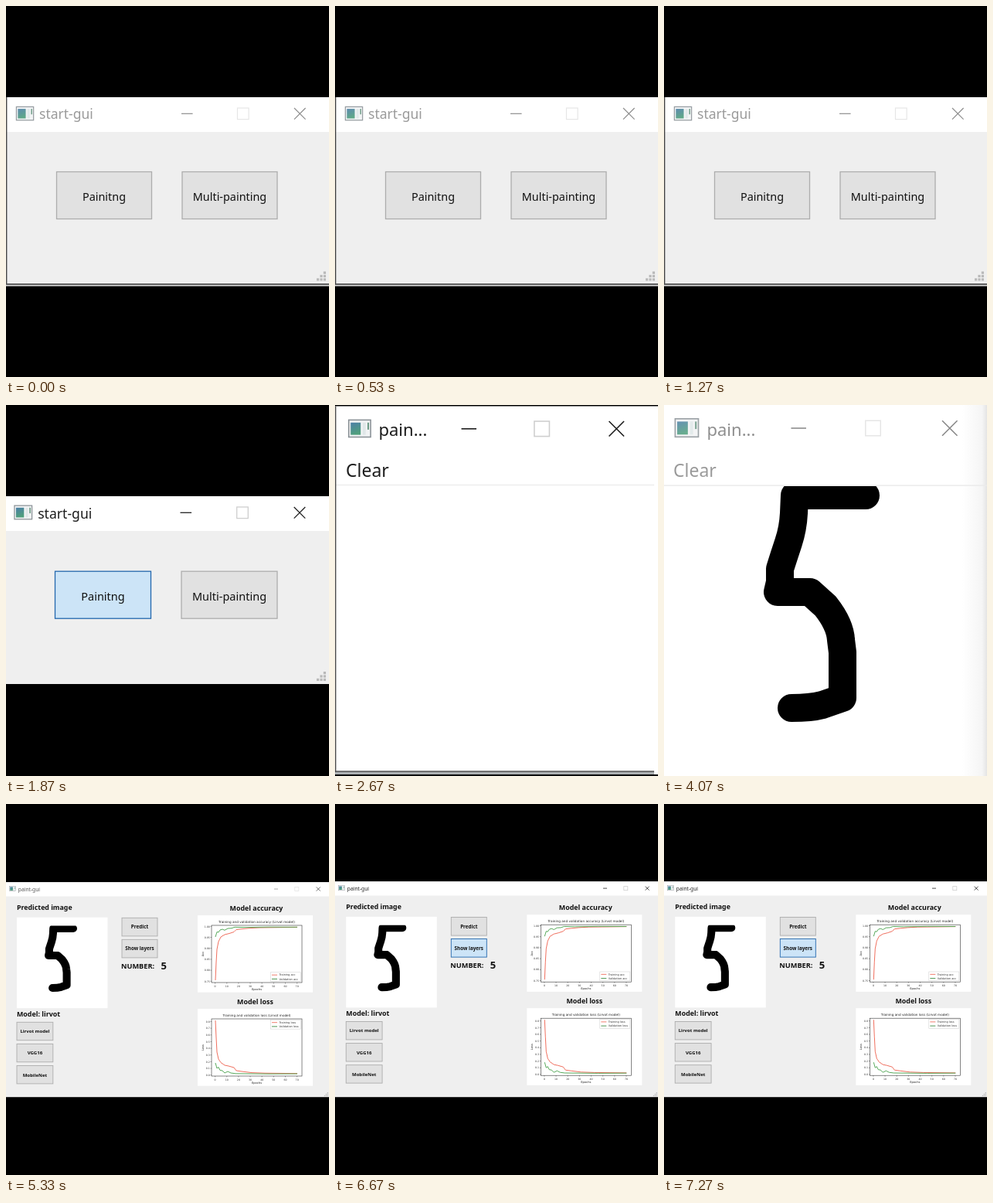
Write an HTML page that moves like this. It is 418 px wide and 480 px high and loops after 8000 ms.

```html
<!DOCTYPE html>
<html lang="en">
<head>
<meta charset="utf-8">
<title>Paint GUI demo</title>
<style>
html, body { margin: 0; width: 100%; height: 100%; overflow: hidden; background: #000; }
svg { display: block; width: 100vw; height: 100vh; }
text { font-family: "Noto Sans", "Open Sans", sans-serif; white-space: pre; }
.b { font-weight: 700; }
.p { font-family: "DejaVu Sans", sans-serif; }
.mid { text-anchor: middle; }
.end { text-anchor: end; }
</style>
</head>
<body>
<svg id="stage" viewBox="0 0 418 480" preserveAspectRatio="none">
  <defs>
    <linearGradient id="teal" x2="0.3" y2="1">
      <stop offset="0" stop-color="#4c7fa8"/><stop offset="1" stop-color="#4f9f7c"/>
    </linearGradient>
    <linearGradient id="shade">
      <stop offset="0" stop-color="#fff"/><stop offset=".8" stop-color="#f5f5f5"/><stop offset="1" stop-color="#e4e4e4"/>
    </linearGradient>
    <clipPath id="paper"><rect y="105" width="418" height="375"/></clipPath>
  </defs>
  <rect width="418" height="480"/>
</svg>
<script>
const stage = document.getElementById('stage');
const LOOP = 8000;
const START = performance.now();

const rect = (x, y, w, h, fill, stroke = 'none', sw = 1) =>
  `<rect x="${x}" y="${y}" width="${w}" height="${h}" fill="${fill}" stroke="${stroke}" stroke-width="${sw}"/>`;
const path = (d, stroke, sw = 1, extra = '') =>
  `<path d="${d}" fill="none" stroke="${stroke}" stroke-width="${sw}" ${extra}/>`;
const text = (s, x, y, size, cls = '', fill = '#111', extra = '') =>
  `<text x="${x}" y="${y}" font-size="${size}" class="${cls}" fill="${fill}" ${extra}>${s}</text>`;
const group = (s, attrs) => `<g ${attrs}>${s}</g>`;
const line = pts => 'M' + pts.map(p => p.join(' ')).join('L');

// Application icon in a 23 x 18 box
function icon(x, y, k, alpha = 1) {
  return group(
    rect(.6, .6, 21.8, 17, '#f1f3f4', '#8b9297', 1.2) +
    rect(2.5, 3.2, 10, 12.2, 'url(#teal)') +
    rect(14.5, 3.2, 3, 12.2, '#dfe7e8') +
    rect(19.2, 3.2, 1.6, 7, '#6c9a86'),
    `transform="translate(${x} ${y}) scale(${k})" opacity="${alpha}"`);
}

// Minimise, maximise and close marks, each s wide and centred on y
function controls(xs, y, s, sw, dark, pale) {
  const [a, b, c] = xs, h = s / 2;
  return path(`M${a - h} ${y}h${s}`, dark, sw) +
    rect(b - h, y - h, s, s, 'none', pale, sw) +
    path(`M${c - h} ${y - h}l${s} ${s}m0 ${-s}l${-s} ${s}`, dark, sw);
}

function grip(x, y, pitch, size) {
  let out = '';
  for (let r = 0; r < 3; r++)
    for (let c = 2 - r; c < 3; c++)
      out += rect(x + c * pitch, y + r * pitch, size, size, '#b9b9b9');
  return out;
}

function button(label, x, y, w, h, size, cls, dy, hot) {
  return rect(x, y, w, h, hot ? '#cce4f7' : '#e1e1e1', hot ? '#2468ad' : '#adadad', h > 40 ? 1.3 : .9) +
    text(label, x + w / 2, y + h / 2 + dy, size, 'mid ' + cls);
}

function startIdle() {
  return rect(0, 118, 418, 242, '#efefef') + rect(0, 118, 418, 45, '#fff') +
    icon(12.8, 129.8, 1.02, .9) + text('start-gui', 43, 146.3, 17.5, '', '#9a9a9a') +
    controls([234.3, 306.8, 380.3], 139.3, 14.6, 1.2, '#8d8d8d', '#e6e6e6') +
    button('Painitng', 65.5, 214.5, 123, 61, 14.4, '', 7) +
    button('Multi-painting', 228, 214.5, 123, 61, 14.4, '', 7) +
    grip(402, 343.5, 4.4, 3.2) +
    rect(0, 118, 1.4, 242, '#4a4a4a') + rect(0, 359, 418, 1.4, '#555') +
    rect(0, 360.6, 418, 1.9, '#dcdcdc');
}

function startHover() {
  return rect(0, 118, 418, 243, '#efefef') + rect(0, 118, 418, 45, '#fff') +
    icon(10.3, 129.5, 1.04) + text('start-gui', 41.2, 146.5, 17.6, '', '#1c1c1c') +
    controls([232.8, 306, 380], 139.3, 14.6, 1.3, '#222', '#cfcfcf') +
    button('Painitng', 63.5, 215.2, 124, 61, 14.5, '', 7, true) +
    button('Multi-painting', 227, 215.2, 124, 61, 14.5, '', 7) +
    grip(402, 345, 4.4, 3.2);
}

function blank() {
  return rect(0, 1.5, 418, 476.5, '#fff') +
    icon(17, 18.6, 1.3) + text('pain...', 56.5, 40.3, 22, '', '#1c1c1c') +
    controls([173.3, 267.7, 364.3], 30.8, 19.5, 1.6, '#1c1c1c', '#cfcfcf') +
    text('Clear', 14, 93, 23, '', '#1c1c1c') +
    rect(0, 102.7, 413, 1.6, '#ededed') +
    rect(0, 1.5, 1.5, 475, '#5a5a5a') +
    rect(0, 473.3, 413, 1.6, '#4c4c4c') + rect(0, 474.9, 413, 3, '#a9adb0');
}

const five = group(
  path('M261 117H169L168 140Q167 160 161 178T150 212V229L147 242H189L209 260Q228 284 229 304L231 320V379L205 388Q190 392 165 392',
    '#000', 36, 'stroke-linecap="round" stroke-linejoin="round"'),
  'clip-path="url(#paper)"');

function drawn() {
  return rect(0, 0, 418, 480, '#fff') + rect(386, 0, 32, 480, 'url(#shade)') +
    icon(13.6, 17, 1.38, .85) + text('pain...', 55.5, 39.5, 22, '', '#8f8f8f') +
    controls([174.2, 270.5, 369.8], 30, 19.5, 1.5, '#858585', '#e6e6e6') +
    text('Clear', 12, 93, 23, '', '#9a9a9a') +
    rect(0, 103.4, 418, 1.5, '#ebebeb') + five;
}

// Chart on a 149 x 100 sheet whose top left corner is (248, top)
function chart(top, kind, name, ticks, red, green, legendY) {
  const at = pts => line(pts.map(([x, y]) => [x, y]));
  let s = rect(248, top, 149, 99.7, '#fff') +
    rect(266, top + 13, 117, 74, 'none', '#333', .6) +
    text(`Training and validation ${name} (Lirvot model)`, 324.5, top + 10.3, 4.2, 'p mid', '#222');
  for (let i = 0; i < 8; i++) {
    const x = 270.6 + i * 15.15;
    s += path(`M${x} ${top + 87}v1.4`, '#333', .5) + text(i * 10, x, top + 92.5, 3.2, 'p mid', '#333');
  }
  ticks.forEach(([label, y]) => {
    s += path(`M266 ${y}h-1.4`, '#333', .5) + text(label, 263.8, y + 1.2, 3.2, 'p end', '#333');
  });
  s += text('Epochs', 324.5, top + 97.3, 3.7, 'p mid', '#222') +
    text(kind, 0, 0, 3.7, 'p mid', '#222', `transform="translate(255.5 ${top + 50}) rotate(-90)"`) +
    path(at(red), '#f0705f', 1, 'stroke-linejoin="round"') +
    path(at(green), '#46a04a', .9, 'stroke-linejoin="round"') +
    rect(342.5, legendY, 39, 11.8, '#fff', '#ccc', .5);
  [['Training', '#f0705f'], ['Validation', '#3a8a40']].forEach(([t, c], i) => {
    const y = legendY + 3.4 + i * 5.2;
    s += path(`M344 ${y}h7`, c, .9) + text(`${t} ${kind.toLowerCase()}`, 353.5, y + 1.2, 3.5, 'p', '#333');
  });
  return s;
}

const scale = (n, from, step, digits, y0, dy) =>
  Array.from({ length: n }, (_, i) => [(from - i * step).toFixed(digits), y0 + i * dy]);

const charts =
  chart(144, 'Acc', 'accuracy', scale(6, 1, .05, 2, 158.3, 14.2),
    [[271, 228], [272, 205], [273, 188], [275, 178], [278, 172], [283, 169], [289, 167.5], [295, 165.5], [298, 162.5],
     [305, 161.7], [315, 160.7], [328, 160], [345, 159.8], [377, 159.4]],
    [[271, 172], [273, 165.5], [275, 166], [277, 163], [280, 162], [283, 163.3], [287, 161], [292, 160.7], [296, 159.3],
     [310, 159.6], [340, 159.2], [377, 159.3]], 217.8) +
  chart(265, 'Loss', 'loss', scale(9, .8, .1, 1, 281.5, 8.65),
    [[271, 280], [272, 302], [273, 321], [275, 330], [278, 334.5], [283, 338], [288, 339], [295, 341], [298, 345],
     [305, 346], [318, 347.6], [335, 348.2], [377, 348.7]],
    [[271, 335], [273, 342], [275, 340.5], [277, 344.5], [280, 345], [283, 348], [287, 346], [291, 348], [297, 348.8],
     [340, 349.2], [377, 349]], 279.3);

function result(active) {
  const body =
    text('Predicted image', 14, 137.2, 8.8, 'b') +
    rect(14, 146.7, 117.5, 117.5, '#fff') +
    group(five, 'transform="translate(13.9 128.2) scale(.28)"') +
    button('Predict', 150, 147.3, 46, 23.6, 6.3, 'b', 2.3) +
    button('Show layers', 150, 175.3, 46, 23.6, 6.3, 'b', 2.3, active) +
    text('NUMBER:', 149, 212.5, 9.2, 'b') + text('5', 200.5, 213.8, 13, 'b') +
    text('Model: lirvot', 14, 275.2, 8.9, 'b') +
    ['Lirvot model', 'VGG16', 'MobileNet'].map((t, i) =>
      button(t, 14, 282.3 + i * 28.1, 46.8, 23.4, 6, 'b', 2.3)).join('') +
    text('Model accuracy', 324, 137.6, 8.9, 'b mid') +
    text('Model loss', 322.5, 258.8, 8.9, 'b mid') + charts;
  const top = active ? 100.3 : 101.2;
  return rect(0, top, 418, 379.2 - top, '#efefef') + rect(0, top, 418, 18.2, '#fff') +
    icon(4.3, top + 5, .37) +
    text('paint-gui', 15.8, top + 11.3, 6.7, '', active ? '#222' : '#555') +
    controls([349.5, 376.3, 404.2], top + 8.8, 5, .8, active ? '#222' : '#9a9a9a', active ? '#d0d0d0' : '#e4e4e4') +
    (active ? '' : path('M401.7 107.5l5 5m0 -5l-5 5', '#777', .8)) +
    group(body, active ? 'transform="translate(.3 -.8)"' : '') +
    grip(411.8, 373, 1.9, 1.3);
}

const scenes = [
  [0, startIdle()], [1330, startHover()], [2670, blank()],
  [4000, drawn()], [5330, result(false)], [6670, result(true)]
].map(([at, markup]) => {
  const g = document.createElementNS(stage.namespaceURI, 'g');
  g.innerHTML = markup;
  stage.append(g);
  return { at, g };
});

function render(t) {
  scenes.forEach(({ at, g }, i) => {
    const next = i + 1 < scenes.length ? scenes[i + 1].at : LOOP;
    g.style.display = t >= at && t < next ? '' : 'none';
  });
}

function tick() {
  render((performance.now() - START) % LOOP);
  requestAnimationFrame(tick);
}
render(0);
tick();
</script>
</body>
</html>
```
